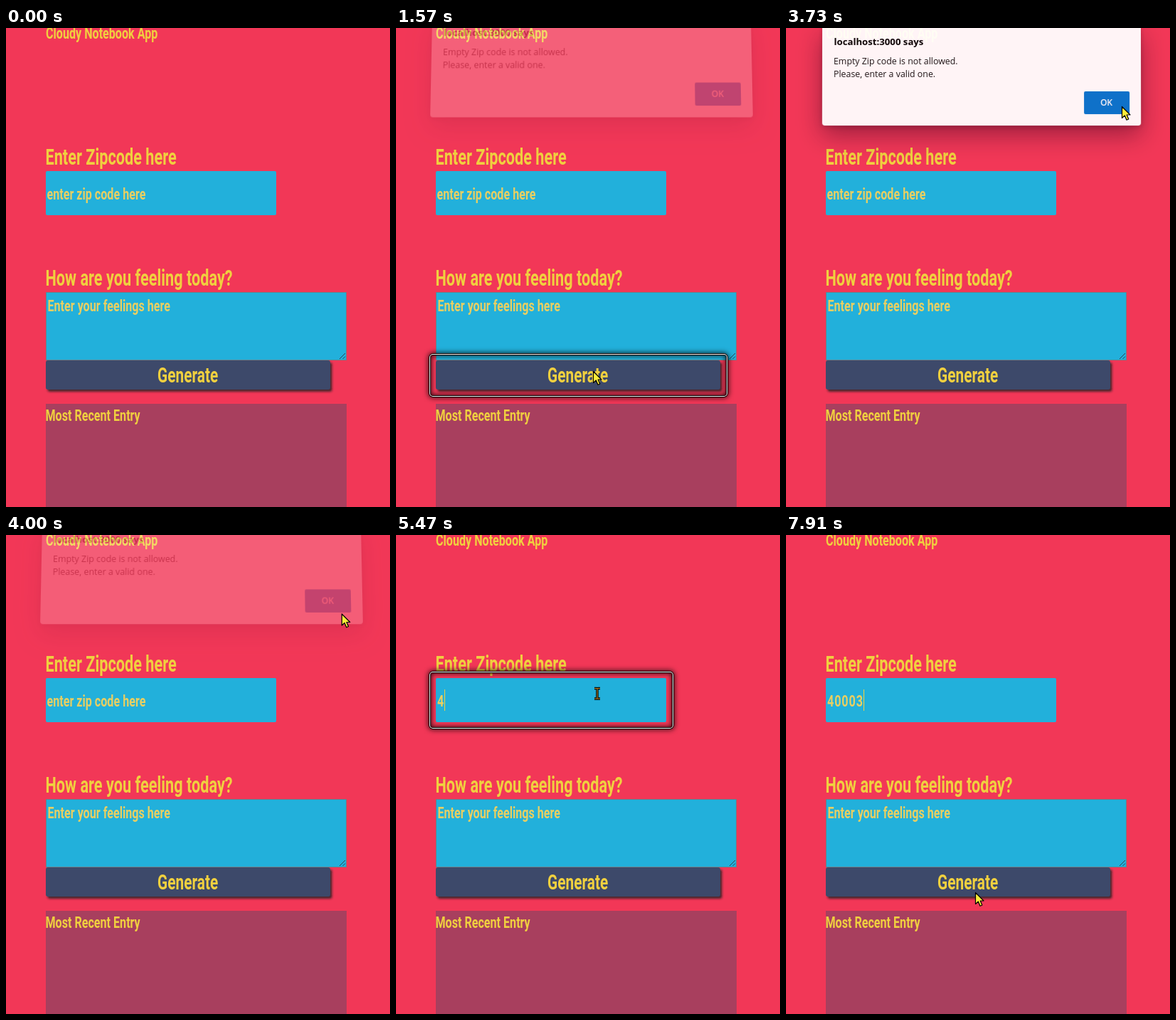
These frames come from a looping animation (540 by 673 pixels, 8 s). An HTML page:

```html
<!DOCTYPE html>
<html lang="en">
<head>
<meta charset="utf-8">
<title>Zip code form</title>
<style>
  html, body { margin: 0; width: 100%; height: 100%; overflow: hidden; background: #f23757; }
  #stage { position: absolute; left: 0; top: 0; width: 540px; height: 673px; overflow: hidden; }
  #stage > * { position: absolute; left: 0; top: 0; }
  svg { display: block; overflow: visible; }
  .face { font-family: Roboto, sans-serif; font-weight: 600; fill: #f0d03f; }
  .hint { fill: #e8cf62; }
  .digits { letter-spacing: 1.3px; }
  .ring {
    box-sizing: border-box; border: 1.5px solid #000; border-radius: 4px; opacity: 0;
    box-shadow: 0 0 0 1px #fff, 0 0 0 2px #100, 0 0 7px 3px rgba(0,0,0,.75), inset 0 0 6px 1px rgba(0,0,0,.75);
  }
  #dialog {
    width: 448px; height: 138px; margin-left: 51px; opacity: 0; background: #fff;
    border-radius: 0 0 4px 4px; transform-origin: 50% 0;
    box-shadow: 0 13px 34px rgba(50,0,30,.48), 0 2px 6px rgba(50,0,30,.25);
    font-family: "Open Sans", sans-serif;
  }
</style>
</head>
<body>
<div id="stage">
  <svg width="540" height="673">
    <defs>
      <filter id="drop" x="-5%" y="-30%" width="110%" height="170%">
        <feDropShadow dx="2.5" dy="3" stdDeviation="1.6" flood-color="#222" flood-opacity=".8"/>
      </filter>
    </defs>
    <rect width="540" height="673" fill="#f23757"/>
    <rect x="56" y="201" width="324" height="62" rx="2" fill="#22b0db"/>
    <rect x="56.5" y="371.5" width="422" height="95" fill="#22b0db" stroke="#69808a"/>
    <path d="M469 465l8-8M473.5 465l3.5-3.5" stroke="#30424c" fill="none"/>
    <rect x="56" y="467" width="400" height="41" rx="3" fill="#3c4a6b" filter="url(#drop)"/>
    <rect x="56" y="528" width="423" height="145" fill="#a83f5e"/>
    <g id="labels"></g>
    <path id="caret" d="M0 217v30" stroke="#f5d23e"/>
  </svg>
  <div class="ring" id="buttonRing" style="left:48px;top:459px;width:417px;height:58px"></div>
  <div class="ring" id="inputRing" style="left:48px;top:193px;width:341px;height:78px"></div>
  <div id="dialog">
    <svg width="448" height="138">
      <text x="16.5" y="25" font-size="13.2" font-weight="700">localhost:3000 says</text>
      <g font-size="12.4" fill="#111">
        <text x="16" y="52.5">Empty Zip code is not allowed.</text>
        <text x="16" y="70.5">Please, enter a valid one.</text>
      </g>
      <rect x="368" y="90" width="64" height="32" rx="2" fill="#0074d0"/>
      <text x="399.5" y="110" font-size="12" font-weight="600" fill="#fff" text-anchor="middle">OK</text>
    </svg>
  </div>
  <svg width="540" height="673">
    <g id="pointer">
      <path id="arrow" d="M.5 .5V16.5L4.3 13 7 19.3 9.8 18 7.2 12H12Z" fill="#fcee3a" stroke="#000" stroke-width="1.2" stroke-linejoin="round"/>
      <g id="beam" fill="none">
        <path id="beamShape" d="M-4 2.5h3q1 0 1 1.5v11.5q0 1.5-1 1.5h-3M4 2.5H1q-1 0-1 1.5M4 17H1q-1 0-1-1.5" stroke="#000" stroke-width="3.4"/>
        <path d="M-4 2.5H4M0 2.5V17M-4 17H4" stroke="#b8862a" stroke-width="1.1"/>
      </g>
    </g>
  </svg>
</div>
<script>
const LOOP = 8000, CONDENSE = 0.707, FOCUS = 4670, BLINK = 530;
const SVG = 'http://www.w3.org/2000/svg';
const $ = id => document.getElementById(id);

function label(text, x, y, size, extra = '') {
  const el = document.createElementNS(SVG, 'text');
  el.textContent = text;
  el.setAttribute('class', 'face ' + extra);
  el.setAttribute('font-size', size);
  el.setAttribute('transform', `translate(${x} ${y}) scale(${CONDENSE} 1)`);
  $('labels').append(el);
  return el;
}

label('Cloudy Notebook App', 56, 14.5, 22.8);
label('Enter Zipcode here', 55.5, 192, 30.7);
label('How are you feeling today?', 55.5, 362, 30.7);
label('Enter your feelings here', 58.5, 398, 22.8, 'hint');
label('Generate', 213, 498, 29.5);
label('Most Recent Entry', 55.5, 552, 22.8);
const placeholder = label('enter zip code here', 57.5, 241, 22.8, 'hint');
const typed = label('', 58, 241, 22.8, 'hint digits');

function move(start, end, d) {
  const path = document.createElementNS(SVG, 'path');
  path.setAttribute('d', d);
  return { start, end, path, length: path.getTotalLength() };
}

const moves = [
  move(200, 1110, 'M467 620Q325 175 277 482'),
  move(1910, 2680, 'M277 482Q360 260 476 113'),
  move(2750, 2900, 'M476 113L472 110'),
  move(4000, 4470, 'M472 110Q385 290 283 213'),
  move(7150, 7910, 'M283 213C350 400 300 575 266 502')
];

const ramp = (t, from, to) => Math.min(1, Math.max(0, (t - from) / (to - from)));
const pulse = (t, inFrom, inTo, outFrom, outTo) => ramp(t, inFrom, inTo) - ramp(t, outFrom, outTo);
const inside = (p, left, top, right, bottom) => p.x > left && p.x < right && p.y > top && p.y < bottom;
const show = (el, on) => { el.style.display = on ? '' : 'none'; };

function drawPointer(t) {
  const current = moves.filter(m => m.start <= t).pop();
  show($('pointer'), current);
  if (!current) return;
  const p = current.path.getPointAtLength(current.length * ramp(t, current.start, current.end));
  const overField = inside(p, 56, 201, 380, 263) || inside(p, 56, 372, 479, 466);
  $('pointer').setAttribute('transform', `translate(${p.x} ${p.y})`);
  show($('arrow'), !overField);
  show($('beam'), overField);
}

function drawDialog(t) {
  const shown = pulse(t, 1535, 1710, 3710, 4070), hidden = 1 - shown;
  $('dialog').style.opacity = shown;
  $('dialog').style.transform = hidden
    ? `perspective(600px) translateY(${-17.5 * hidden}px) rotateX(${4 * hidden}deg)` : 'none';
}

// The first digit comes alone, the rest follow at an even pace.
const keyTime = i => i ? 5620 + 250 * i : 5470;

function drawTyping(t) {
  let count = 0;
  while (count < 5 && keyTime(count) <= t) count++;
  const idle = t - (count ? keyTime(count - 1) : FOCUS);
  show(placeholder, !count);
  typed.textContent = '40003'.slice(0, count);
  show($('caret'), idle >= 0 && Math.floor(idle / BLINK) % 2 === 0);
  $('caret').setAttribute('transform', `translate(${Math.round(58 + count * 10.1) + .5} 0)`);
}

function draw(t) {
  drawPointer(t);
  drawDialog(t);
  drawTyping(t);
  $('buttonRing').style.opacity = pulse(t, 1340, 1510, 2690, 3200);
  $('inputRing').style.opacity = pulse(t, 4640, 4810, 5850, 6430);
}

function tick() {
  draw(performance.now() % LOOP);
  requestAnimationFrame(tick);
}
tick();
</script>
</body>
</html>
```
